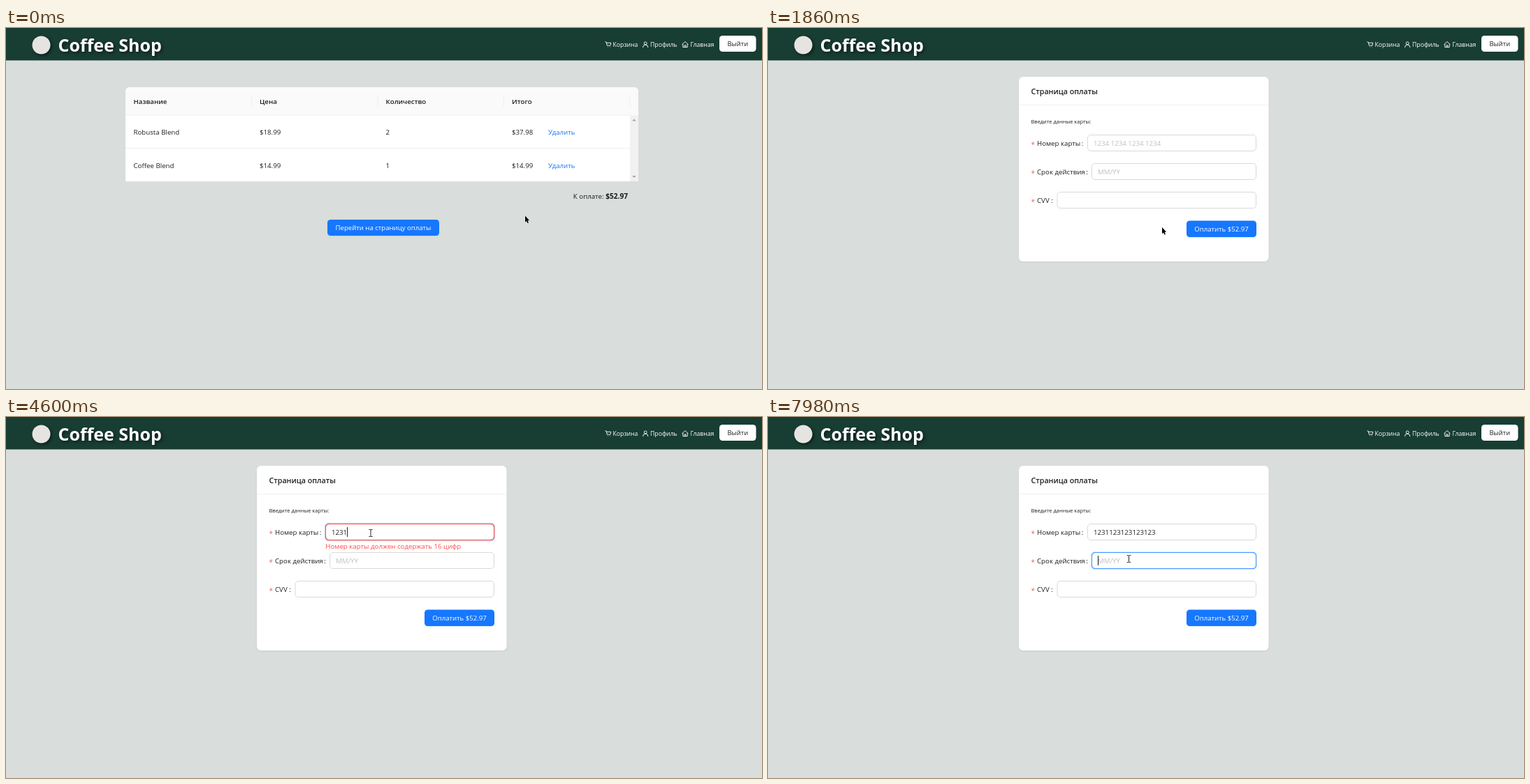
Animation, 1082 px wide and 518 px high, one loop 8000 ms. Source, as an HTML page with a canvas:

```html
<!DOCTYPE html>
<html lang="ru">
<head>
<meta charset="utf-8">
<title>Coffee Shop</title>
<style>
  html, body { margin: 0; width: 100%; height: 100%; overflow: hidden; background: #d9dddb; }
  canvas { display: block; width: 100vw; height: 100vh; }
</style>
</head>
<body>
<canvas id="stage" width="1082" height="518"></canvas>
<script>
const ctx = document.getElementById('stage').getContext('2d');
const LOOP = 8000, TICK = 66.6, BLINK = 535;
const BLUE = '#1677ff', HOVER = '#4096ff', RED = '#ff4d4f', INK = 'rgba(0,0,0,.88)', HINT = 'rgba(0,0,0,.25)';

// Moments of the story, in ms
const OPEN_PAY = 1855, CLICKS = [1725, 3590, 7785];
const ERROR_IN = 4260, ERROR_OUT = 6570;
const run = (start, step, count) => Array.from({ length: count }, (_, i) => start + i * step);
const KEYS = [...run(4260, 111.5, 4), ...run(5455, 99, 9), ...run(6390, 65, 3)];
const CARD = '1231123123123123';

const MOVES = [
  { from: 200, to: 732, a: [743, 269.5], b: [564, 286] },
  { from: 2331, to: 2863, a: [564, 286], b: [522, 166.5] },
  { from: 7260, to: 7658, a: [522, 166.5], b: [516.5, 203.5] }
];

const cartButton = { x: 460, y: 275, w: 160, h: 23 };
const payButton = { x: 599, y: 276.5, w: 100, h: 23.5 };
const fields = [
  { x: 457.5, y: 153.5, w: 241, h: 23, label: 'Номер карты', colon: 448.8, hint: '1234 1234 1234 1234' },
  { x: 463.5, y: 194.5, w: 235, h: 23, label: 'Срок действия', colon: 455.3, hint: 'MM/YY' },
  { x: 414, y: 235.5, w: 284.5, h: 23, label: 'CVV', colon: 405.3, hint: '' }
];

const clamp = v => Math.min(1, Math.max(0, v));
const ramp = (t, start, length) => clamp((t - start) / length);
const inside = ([x, y], r) => x >= r.x && x <= r.x + r.w && y >= r.y && y <= r.y + r.h;

function pointerAt(t) {
  let pos = MOVES[0].a;
  for (const { from, to, a, b } of MOVES) {
    if (t < from) break;
    const p = ramp(t, from, to - from), e = p * p * (3 - 2 * p);
    pos = a.map((v, i) => v + (b[i] - v) * e);
  }
  return pos;
}

function text(str, x, middle, { size = 9.7, weight = 400, color = INK, align = 'left' } = {}) {
  ctx.font = `${weight} ${size}px "Open Sans", "Noto Sans", sans-serif`;
  ctx.textAlign = align;
  ctx.fillStyle = color;
  ctx.fillText(str, x, middle + size * 0.37);
}

function rect(x, y, w, h, color) {
  ctx.fillStyle = color;
  ctx.fillRect(x, y, w, h);
}

function rounded({ x, y, w, h }, radius, fill) {
  ctx.beginPath();
  ctx.roundRect(x, y, w, h, radius);
  if (fill) { ctx.fillStyle = fill; ctx.fill(); }
}

function shadow(color, blur, dx, dy) {
  ctx.shadowColor = color;
  ctx.shadowBlur = blur;
  ctx.shadowOffsetX = dx;
  ctx.shadowOffsetY = dy;
}
const noShadow = () => shadow('transparent', 0, 0, 0);

function line(d, x, y, color, width) {
  ctx.save();
  ctx.translate(x, y);
  ctx.strokeStyle = color;
  ctx.lineWidth = width;
  ctx.stroke(new Path2D(d));
  ctx.restore();
}

function button(box, label, color) {
  rounded({ ...box, y: box.y + 1.4 }, 4.5, 'rgba(5,145,255,.1)');
  rounded(box, 4.5, color);
  text(label, box.x + box.w / 2, box.y + box.h / 2 + 0.3, { size: 9.6, color: '#fff', align: 'center' });
}

function header() {
  rect(0, 0, 1082, 46.5, '#183d33');
  shadow('rgba(0,0,0,.5)', 4, 2, 2);
  ctx.beginPath();
  ctx.arc(50.5, 24.5, 13, 0, Math.PI * 2);
  ctx.fillStyle = '#e6e4e1';
  ctx.fill();
  text('Coffee Shop', 74.5, 24.5, { size: 25, weight: 700, color: '#fff' });
  noShadow();

  line('M0 .5H1.6L2.8 5.6H7.4L8.3 1.8H2M3.5 7.5h.6M6.5 7.5h.6', 857.5, 19.5, '#fff', 0.9);
  line('M6.2 2.6a2 2 0 1 1-4 0a2 2 0 1 1 4 0M.5 8.7a3.7 3.9 0 0 1 7.4 0', 911, 19.3, '#fff', 0.9);
  line('M0 4.8L4.5 .6L9 4.8M1.3 4V8.6H7.7V4M3.6 8.6V5.8H5.4V8.6', 967.5, 19, '#fff', 0.9);
  const link = { size: 8.7, weight: 500, color: '#fff' };
  text('Корзина', 868.5, 24, link);
  text('Профиль', 922, 24, link);
  text('Главная', 979.5, 24, link);
  rounded({ x: 1021, y: 11, w: 52.5, h: 23 }, 4.5, '#fff');
  text('Выйти', 1047.3, 23, { size: 9.4, align: 'center' });
}

function cartPage(t, pointer) {
  rounded({ x: 171, y: 85, w: 734, h: 135 }, [6, 6, 0, 0], '#fff');
  rounded({ x: 171, y: 85, w: 734, h: 40 }, [6, 6, 0, 0], '#fafafa');
  const columns = [182.5, 363, 543.5, 724];
  ['Название', 'Цена', 'Количество', 'Итого'].forEach((name, i) => {
    text(name, columns[i], 105, { weight: 600 });
    rect(351 + i * 180.4, 97, 1, 16, '#f0f0f0');
  });
  [['Robusta Blend', '$18.99', '2', '$37.98'], ['Coffee Blend', '$14.99', '1', '$14.99']].forEach((row, i) => {
    const y = 149 + i * 48;
    row.forEach((cell, c) => text(cell, columns[c], y));
    text('Удалить', 776, y, { color: BLUE });
  });
  for (const y of [124.5, 172, 219.5]) rect(171, y, 722, 1, '#f0f0f0');
  rect(893, 125, 12, 95, '#f1f1f1');
  ctx.fillStyle = '#a3a3a3';
  ctx.fill(new Path2D('M896.2 133.5h5.6l-2.8-3zM896.2 212h5.6l-2.8 3z'));
  text('К оплате:', 855.5, 241, { align: 'right' });
  text('$52.97', 890, 241, { size: 10.1, weight: 700, align: 'right' });

  const pressed = t >= CLICKS[0] && t < CLICKS[0] + TICK;
  button(cartButton, 'Перейти на страницу оплаты',
    pressed ? '#0958d9' : inside(pointer, cartButton) ? '#3a8dfe' : BLUE);
}

function outline(field, color, ring, alpha) {
  ctx.globalAlpha = alpha;
  if (ring) {
    rounded({ x: field.x - 1, y: field.y - 1, w: field.w + 2, h: field.h + 2 }, 5.5);
    ctx.strokeStyle = ring;
    ctx.lineWidth = 1.5;
    ctx.stroke();
  }
  rounded(field, 4.5);
  ctx.strokeStyle = color;
  ctx.lineWidth = 1;
  ctx.stroke();
  ctx.globalAlpha = 1;
}

function payPage(t, pointer) {
  shadow('rgba(0,0,0,.06)', 3, 0, 1);
  rounded({ x: 359, y: 70, w: 357.5, h: 265 }, 6, '#fff');
  noShadow();
  rect(359, 110, 357.5, 1, '#f0f0f0');
  text('Страница оплаты', 376.5, 91, { size: 10.7, weight: 600 });
  text('Введите данные карты:', 376.5, 134.5, { size: 7.5 });

  const focused = t < CLICKS[1] ? -1 : t < CLICKS[2] ? 0 : 1;
  const pressed = KEYS.filter(k => k <= t);
  const typed = CARD.slice(0, pressed.length);
  const errorText = ramp(t, ERROR_IN - 60, 300) * (1 - ramp(t, ERROR_OUT, 330));
  const errorLine = ramp(t, ERROR_IN - 60, 200) * (1 - ramp(t, ERROR_OUT, 200));

  fields.forEach((field, i) => {
    const y = field.y + 11.7;
    text('*', 376.5, y + 1.6, { size: 10, color: '#ea6a60' });
    text(field.label, 385, y);
    text(':', field.colon, y);
    rounded(field, 4.5, '#fff');
    outline(field, '#d9d9d9', null, 1);
    if (inside(pointer, field)) outline(field, HOVER, null, 1);
    if (focused === i) outline(field, HOVER, 'rgba(5,145,255,.14)', ramp(t, CLICKS[i + 1] - 60, 200));
    if (i === 0 && errorLine) outline(field, RED, 'rgba(255,38,5,.14)', errorLine);

    const value = i === 0 ? typed : '';
    const left = field.x + 8.5;
    text(value || field.hint, left, y, { color: value ? INK : HINT });
    if (focused === i) {
      const width = ctx.measureText(value).width;
      const since = Math.max(CLICKS[i + 1], i === 0 ? pressed.at(-1) || 0 : 0);
      if ((t - since) % (2 * BLINK) < BLINK) rect(Math.floor(left + width), field.y + 4.5, 1, 14, '#222');
    }
  });

  ctx.globalAlpha = errorText;
  text('Номер карты должен содержать 16 цифр', 457.3, 185.2 - 3 * (1 - errorText), { color: RED });
  ctx.globalAlpha = 1;
  button(payButton, 'Оплатить $52.97', inside(pointer, payButton) ? HOVER : BLUE);
}

function cursor(t, [x, y]) {
  const paying = t >= OPEN_PAY;
  if (CLICKS.some(c => t >= c && t < c + TICK)) {
    ctx.beginPath();
    ctx.arc(x + 0.5, y, 9, 0, Math.PI * 2);
    ctx.fillStyle = 'rgba(250,238,60,.85)';
    ctx.fill();
  }
  if (paying && fields.some(f => inside([x, y], f))) {
    line('M-2.5 -5H-.7L0 -4.4L.7 -5H2.5M0 -4.4V4.4M-2.5 5H-.7L0 4.4L.7 5H2.5', x, y, '#222', 1);
    return;
  }
  const hand = !paying && inside([x, y], cartButton);
  const shape = new Path2D(hand
    ? 'M-.6 .6Q.5 -.9 1.5 .6V4L5 4.8Q6.2 5.1 6 6.5L5.2 9.5V11.5H.4L-2.4 7.2Q-2.6 5.8 -1.4 6.2L-.6 7Z'
    : 'M0 0V9.2L2 7.4L3.4 10.6L5 9.9L3.6 6.8H6.2Z');
  ctx.save();
  ctx.translate(x, y);
  ctx.fillStyle = hand ? '#fff' : '#000';
  ctx.strokeStyle = hand ? '#000' : '#fff';
  ctx.lineWidth = hand ? 0.9 : 1;
  if (hand) ctx.fill(shape);
  ctx.stroke(shape);
  if (!hand) ctx.fill(shape);
  ctx.restore();
}

function draw(now) {
  const t = Math.floor((now % LOOP + 15) / TICK) * TICK;
  const pointer = pointerAt(t);
  rect(0, 0, 1082, 518, '#d9dddb');
  header();
  (t < OPEN_PAY ? cartPage : payPage)(t, pointer);
  cursor(t, pointer);
}

let start;
function frame(now) {
  start ??= now;
  draw(now - start);
  requestAnimationFrame(frame);
}
draw(0);
requestAnimationFrame(frame);
</script>
</body>
</html>
```
